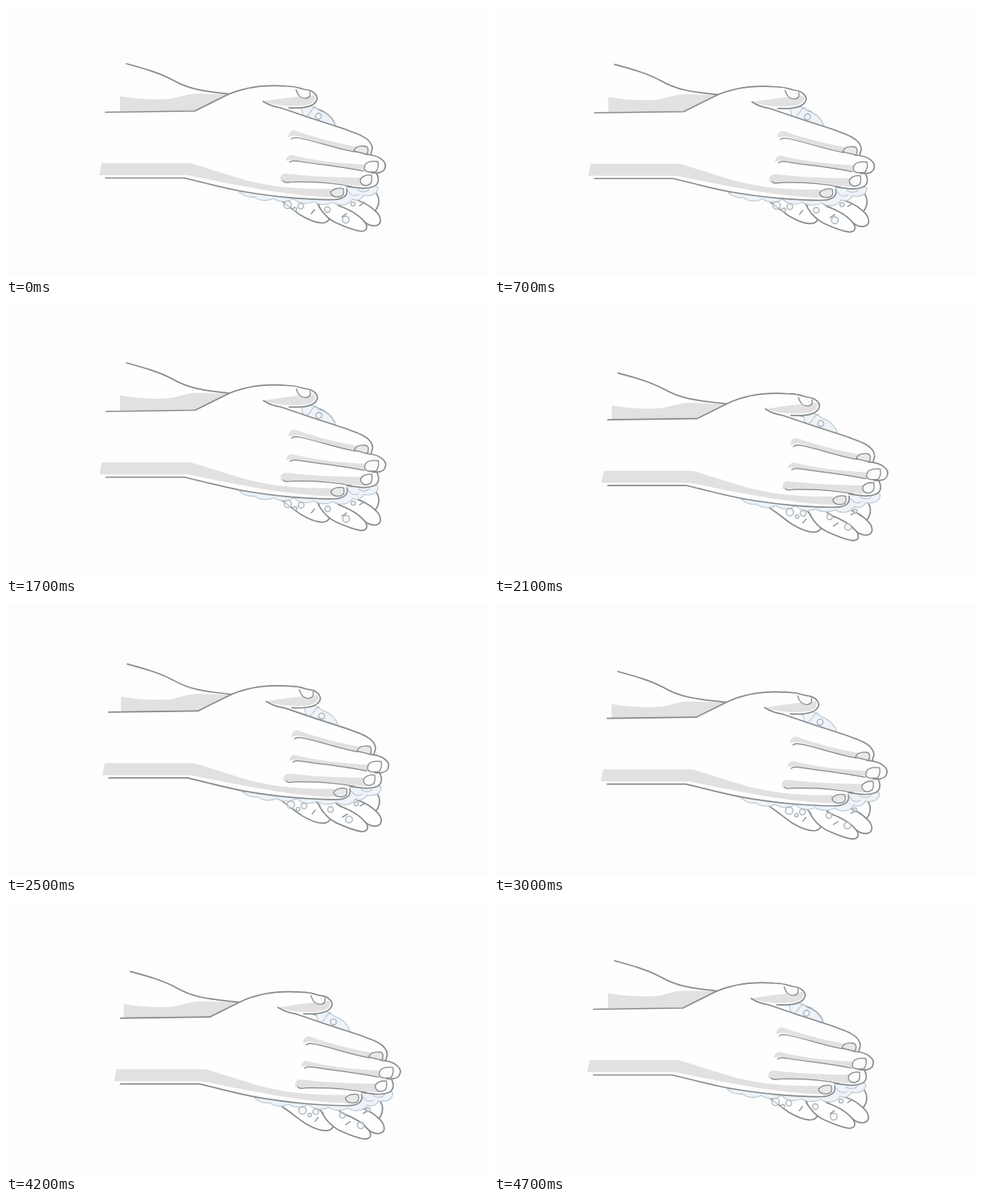
Write an HTML page that moves like this. It is 600 px wide and 338 px high and loops after 4800 ms.

```html
<!DOCTYPE html>
<html lang="en">
<head>
<meta charset="utf-8">
<title>Hand washing</title>
<style>
  html, body { margin: 0; width: 100%; height: 100%; overflow: hidden; background: #fdfdfd; }
  svg { display: block; width: 600px; height: 338px; }
  .line { fill: none; stroke: #868b8e; stroke-width: 1.7; stroke-linecap: round; stroke-linejoin: round; }
  .thin { stroke-width: 1.25; }
  .skin { fill: #fefefe; }
  .shade { fill: #e2e0e1; }
  .foam { fill: #edf3f8; stroke: #c0cdd5; stroke-width: 1.3; stroke-linejoin: round; }
  .bubble { fill: #f1f5f9; fill-opacity: .6; stroke: #abb6bd; stroke-width: 1.4; }
  .nail { fill: #e9e8e9; stroke: #868b8e; stroke-width: 1.3; stroke-linejoin: round; }
  .pale { fill: #fbfbfb; }
</style>
</head>
<body>
<svg viewBox="0 0 600 338">
  <g id="back">
    <path class="skin" d="M150 72C172 78 190 83 207 92C224 102 240 107 300 111V131H142Z"/>
    <path class="shade" d="M142 112.5C164 116 188 118 206 115.5C219 113 224 109.5 240 109.2L300 111V131H142Z"/>
    <path class="line" d="M150 72C172 78 190 83 207 92C224 102 240 107 300 111.5"/>
    <path class="skin line" d="M350 122C370 122 384 126 394 131C403 136 409 143 410 151L398 160"/>
    <!-- fingers -->
    <path class="skin line" d="M440 220C456 226 464 233 464 243C464 250 461 254 458 257L430 250"/>
    <path class="skin line" d="M428 240C442 242 453 248 463 259C468 266 467 273 460 274C453 275 448 271 442 266L410 246"/>
    <path class="skin line" d="M338 240C348 246 358 255 367 261C379 268 390 272 397 270C403 268 404 264 400 260L380 238"/>
    <path class="skin line" d="M389 249C394 258 402 266 410 270C421 275 433 280 442 281C449 281 451 276 447 270C440 261 428 254 414 249"/>
    <path class="line thin" d="M380 259L384 254M418 263L424 259M440 249L445 246"/>
  </g>
  <g id="suds">
    <path class="foam" d="M366 122C374 122 384 125 391 131C401 134 408 142 410 151L396 149C388 148 381 142 370 138Z"/>
    <path class="foam" d="M290 232C297 237 301 239 309 238C315 243 325 244 333 240C340 245 351 245 358 240C364 247 375 248 383 244C391 249 400 248 407 245C416 251 427 248 431 241C437 244 443 241 445 236C454 238 463 235 463 226L440 215L400 232L320 229Z"/>
    <path class="line thin" stroke-opacity=".4" d="M426 231C429 236 434 238 439 235M438 229C442 233 449 232 452 229M375 137C381 132 380 127 386 126"/>
    <g id="bubbles"></g>
  </g>
  <g id="front">
    <path class="skin" d="M124 132.5L235 131L273 112C294 102 322 98 349 100L371 104C384 105 389 114 385 120C381 126 371 128 341 127L380 140L414 151C438 159 455 166 455 178L454 185C467 187 473 194 472 200C471 206 468 208 462 209C464 216 463 222 457 226C449 229 436 227 422 226C427 232 425 239 416 241C392 243 330 237 291 231C260 225 240 218 222 214.5L124 214.5L116 211L119 196Z"/>
    <!-- shading -->
    <path class="shade" d="M119 196H230L291 215C325 225 360 229 404 228L414 238C394 239 365 236 331 231C288 224 255 217 226 211H116Z"/>
    <path class="shade" d="M320 119C338 116 354 114 363 113L384 111C387 118 381 123 371 124C354 126 335 124 320 119Z"/>
    <path class="shade" d="M351 164C352 158 354 155 359 155C378 162 406 170 434 175L450 174L452 184C430 184 398 172 366 163C360 161 355 162 351 164Z"/>
    <path class="shade" d="M348 193C350 187 353 185 357 186C382 193 416 196 447 198L462 207C448 207 430 204 412 200L365 194C357 192 352 192 348 193Z"/>
    <path class="shade" d="M342 219C340 213 343 209 348 209C374 212 407 214 441 214L456 222C444 228 424 222 405 220Z"/>
    <!-- contours -->
    <path class="line" d="M124 132.5L235 131L273 112C294 102 322 98 349 100C360 100 365 102 371 104C384 105 390 113 386 119C382 126 371 128 352 127"/>
    <path class="line" d="M320 119C328 124 334 126 342 127L380 140L414 151C438 159 456 165 456 178L454 185"/>
    <path class="line thin" d="M355 166C357 163 362 164 367 165C390 170 411 178 434 182"/>
    <path class="line thin" d="M353 195C355 192 361 193 366 194C391 198 419 200 445 206"/>
    <path class="line thin" d="M345 218C346 221 350 220 356 219.5C382 219 407 220 430 225"/>
    <path class="line" d="M448 185C466 186 474 195 472 201C471 207 466 209 455 208M461 208C465 216 464 222 458 225C449 229 438 227 424 225"/>
    <path class="line" d="M124 214.5H222C242 219 266 226 293 231C332 238 378 242 408 241.5C422 241 426 235 424 228"/>
    <!-- nails -->
    <path class="nail pale" d="M361 104C363 112 368 116 374 115C379 114 379 110 378 107"/>
    <path class="nail" d="M433 181C435 175 442 174 448 175C452 177 451 182 449 185Z"/>
    <path class="nail pale" d="M463 194C455 193 449 195 447 198C445 203 446 206 451 207L460 207C464 203 464 199 463 194Z"/>
    <path class="nail pale" d="M455 211C448 210 442 213 441 217C441 221 444 224 448 224C455 223 456 219 455 211Z"/>
    <path class="nail" d="M420 228C414 226 407 228 404 232C404 236 409 239 415 238C421 237 421 233 420 228Z"/>
  </g>
</svg>
<script>
  const LOOP = 4800, STEP = 100, CYCLE = 940, HALF = CYCLE / 2;
  const REACH = { back: [4.7, 13.4], suds: [18.6, 10.8], front: [18.6, 11.2] };
  const BUBBLES = [
    [350.5, 248, 4.6], [367, 249.5, 3.6], [359.5, 253.5, 2.2],
    [400, 254, 3.5], [423, 266.5, 4.2], [432, 247, 2.6], [389, 137.5, 3.7]
  ];
  const byId = id => document.getElementById(id);

  for (const [cx, cy, r] of BUBBLES) {
    const dot = document.createElementNS("http://www.w3.org/2000/svg", "circle");
    for (const [key, value] of Object.entries({ cx, cy, r, class: "bubble" })) dot.setAttribute(key, value);
    byId("bubbles").append(dot);
  }

  // Quick push forward, then a softer pull back; both decelerate.
  function push(time) {
    const phase = time % CYCLE;
    return phase < HALF
      ? 1 - (1 - phase / HALF) ** 5
      : (2 - phase / HALF) ** 4;
  }

  const start = performance.now();
  function draw() {
    const time = Math.floor(((performance.now() - start) % LOOP) / STEP) * STEP;
    const amount = push(time);
    for (const [id, [x, y]] of Object.entries(REACH))
      byId(id).setAttribute("transform", `translate(${x * amount} ${y * amount})`);
    requestAnimationFrame(draw);
  }
  draw();
</script>
</body>
</html>
```
